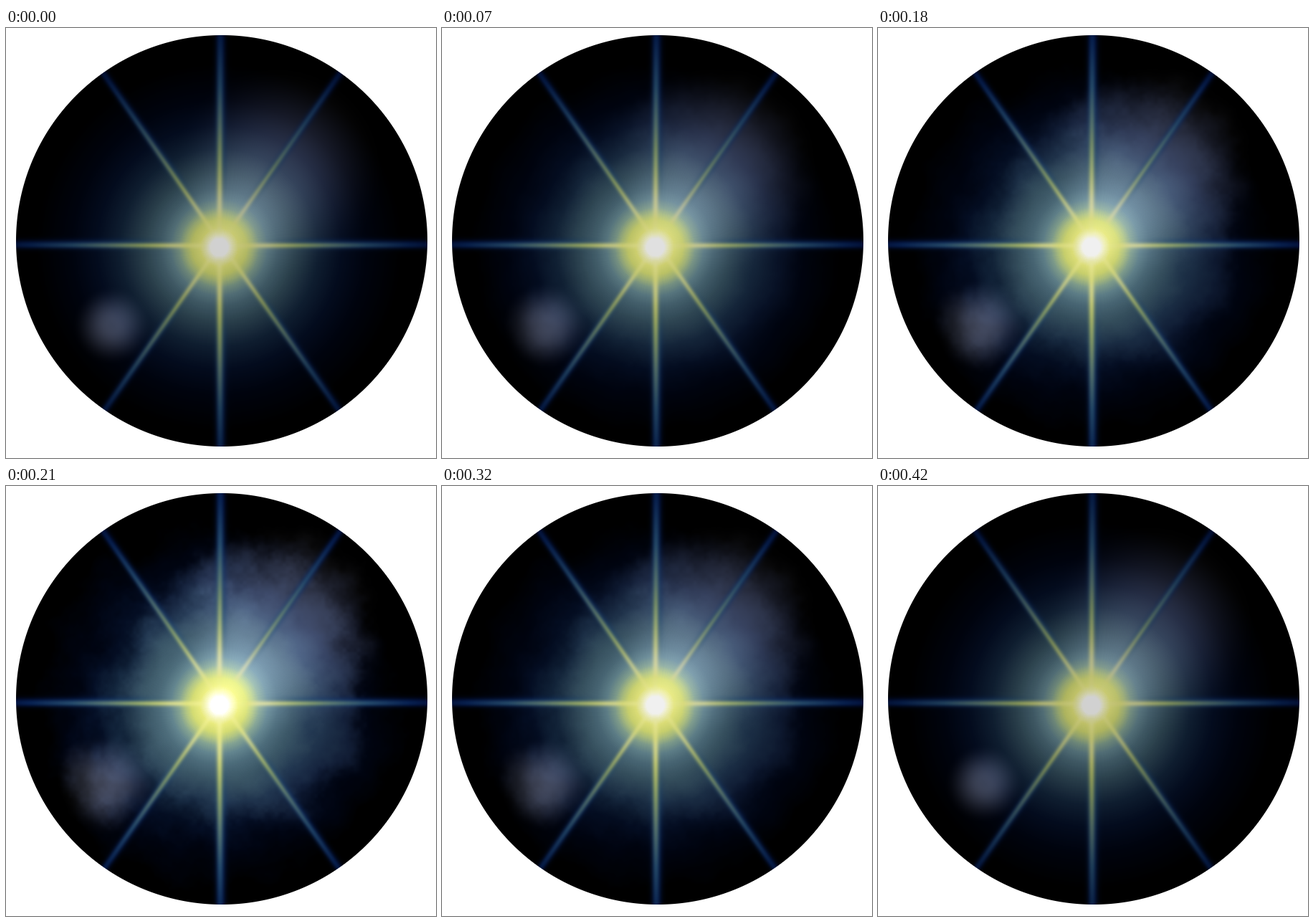
Recreate the animation shown at these times as an HTML page with a canvas. Size 600x600 px, loop 490 ms.

```html
<!DOCTYPE html>
<html lang="en">
<head>
<meta charset="utf-8">
<title>Pulsing star</title>
<style>
html, body { margin: 0; width: 100%; height: 100%; overflow: hidden; background: #fff; }
canvas { display: block; }
</style>
</head>
<body>
<canvas id="stage" width="600" height="600"></canvas>
<script>
const SIZE = 600, STEP = 70, STEPS = 7, PEAK = 3;
const DISC = { x: 301, y: 297, r: 287 };
const STAR = { x: 297.5, y: 306 };
const ctx = document.getElementById('stage').getContext('2d');

const clamp = v => Math.max(0, Math.min(1, v));
const smooth = (a, b, v) => { const t = clamp((v - a) / (b - a)); return t * t * (3 - 2 * t); };
const mix = (a, b, t) => a + (b - a) * t;
const bell = (v, s) => Math.exp(-v * v / (2 * s * s));

// Colour lookup by whole pixels of distance: stops are [distance, r, g, b]
function ramp(stops) {
  const table = [];
  for (let d = 0, i = 0; d < 700; d++) {
    while (i < stops.length - 2 && d > stops[i + 1][0]) i++;
    const a = stops[i], b = stops[i + 1], t = clamp((d - a[0]) / (b[0] - a[0]));
    table.push([1, 2, 3].map(c => mix(a[c], b[c], t)));
  }
  return table;
}

const glow = ramp([
  [0, 255, 255, 255], [12, 255, 255, 250], [18, 247, 247, 195], [27, 232, 234, 125],
  [38, 212, 220, 115], [47, 176, 196, 132], [56, 132, 163, 146], [68, 98, 132, 142],
  [82, 75, 106, 120], [105, 50, 76, 90], [138, 18, 36, 58], [170, 4, 14, 36],
  [205, 0, 4, 17], [255, 0, 0, 0]
]);
const beam = ramp([
  [0, 255, 255, 245], [30, 240, 240, 145], [75, 208, 214, 108], [120, 150, 170, 104],
  [170, 92, 122, 114], [225, 38, 76, 108], [290, 8, 34, 82], [340, 0, 10, 52]
]);
const fringe = ramp([[60, 60, 100, 120], [120, 22, 66, 118], [200, 5, 36, 100], [290, 0, 18, 74], [340, 0, 6, 48]]);

function hash(x, y, seed) {
  let h = Math.imul(x, 374761393) ^ Math.imul(y, 668265263) ^ Math.imul(seed, 974634777);
  h = Math.imul(h ^ (h >>> 13), 1274126177);
  return ((h ^ (h >>> 16)) >>> 0) / 4294967296;
}

function noise(x, y, seed) {
  const ix = Math.floor(x), iy = Math.floor(y);
  const u = smooth(0, 1, x - ix), v = smooth(0, 1, y - iy);
  return mix(
    mix(hash(ix, iy, seed), hash(ix + 1, iy, seed), u),
    mix(hash(ix, iy + 1, seed), hash(ix + 1, iy + 1, seed), u), v);
}

// Layered noise in about -1..1
function cloud(x, y, seed) {
  let sum = 0, amp = 1, f = 1 / 46;
  for (let o = 0; o < 4; o++, amp *= 0.55, f *= 2.1) {
    sum += (noise(x * f, y * f, seed + o) * 2 - 1) * amp;
  }
  return sum / 1.5;
}

const driftX = new Float32Array(SIZE * SIZE), driftY = new Float32Array(SIZE * SIZE);
for (let y = 0, i = 0; y < SIZE; y++) {
  for (let x = 0; x < SIZE; x++, i++) {
    driftX[i] = cloud(x, y, 11);
    driftY[i] = cloud(x, y, 47);
  }
}

const len = Math.hypot(163, 233), dx = 163 / len, dy = 233 / len;
// Unit direction, point on the blue fringe, shift of the bright line, width, strength, fade speed
const rays = [
  { ux: 0, uy: 1, x: 299.7, y: 300, shift: 1.9, w: 3.1, a: 0.95, fade: 1 },
  { ux: 1, uy: 0, x: 300, y: 301.6, shift: 2.2, w: 2.8, a: 0.95, fade: 1.1 },
  { ux: dx, uy: dy, x: 301.5, y: 299, shift: 2.2, w: 2.6, a: 0.75, fade: 1.06 },
  { ux: -dx, uy: dy, x: 301.5, y: 299, shift: 0.6, w: 2.6, a: 0.75, fade: 1.06 }
];

function addRay(col, ray, x, y) {
  const px = x - ray.x, py = y - ray.y;
  const side = px * ray.uy - py * ray.ux;
  if (Math.abs(side) > 20) return;
  const d = Math.hypot(x - STAR.x, y - STAR.y);
  const at = Math.min(699, Math.round(d * ray.fade));
  const halo = bell(side, ray.w * 1.6) * ray.a * 0.8 * smooth(50, 130, d);
  const line = bell(side + ray.shift * (1 - d / 500), ray.w) * ray.a;
  for (let k = 0; k < 3; k++) {
    const base = mix(col[k], fringe[at][k], halo);
    col[k] = mix(base, Math.max(base, beam[at][k]), line);
  }
}

function render(level) {
  const img = ctx.createImageData(SIZE, SIZE), out = img.data;
  const light = mix(0.82, 1, level), col = [0, 0, 0];
  for (let j = 0, i = 0; j < SIZE; j++) {
    for (let k = 0; k < SIZE; k++, i++) {
      const x = k + 0.5, y = j + 0.5;
      const inside = clamp(DISC.r - Math.hypot(x - DISC.x, y - DISC.y) + 0.5);
      col[0] = col[1] = col[2] = 0;
      if (inside > 0) {
        const r = Math.hypot(x - STAR.x, y - STAR.y);
        const push = 22 * level * smooth(70, 190, r);
        const qx = x + driftX[i] * push, qy = y + driftY[i] * push;

        const g = glow[Math.round(Math.hypot(qx - STAR.x, qy - STAR.y))];
        // Large upper right cloud, small lower left one, and the haze that joins them
        const big = 1 - smooth(20 + 20 * level, 150 + 8 * level, Math.hypot(qx - 379, qy - 200));
        const soft = 0.4 * push;
        const small = 1 - smooth(6, 56 + 16 * level, Math.hypot(
          x + driftX[i] * soft - 148 + 7 * level, y + driftY[i] * soft - 415 + 3 * level));
        const body = Math.hypot((qx - 333) / 170, (qy - 280) / 196);
        const haze = level * (1 - smooth(0.82, 1.04, body)) * smooth(60, 150, r);
        const veil = 1 + 0.1 * level * driftX[i] * smooth(80, 170, r);
        col[0] = (g[0] + big * 46 + small * 70 + haze * 15) * veil;
        col[1] = (g[1] + big * 46 + small * 72 + haze * 18) * veil;
        col[2] = (g[2] + big * 53 + small * 80 + haze * 22) * veil;
        for (const ray of rays) addRay(col, ray, x, y);
      }
      for (let c = 0; c < 3; c++) {
        out[i * 4 + c] = mix(255, Math.min(255, col[c]) * light, inside);
      }
      out[i * 4 + 3] = 255;
    }
  }
  return img;
}

const views = [];
for (let n = 0; n <= PEAK; n++) views.push(render(n / PEAK));

let shown = -1;
const start = performance.now();
function draw() {
  const t = Math.max(0, performance.now() - start);
  const step = Math.floor(t / STEP) % STEPS;
  const n = PEAK - Math.abs(step - PEAK);
  if (n !== shown) ctx.putImageData(views[shown = n], 0, 0);
  requestAnimationFrame(draw);
}
draw();
</script>
</body>
</html>
```
